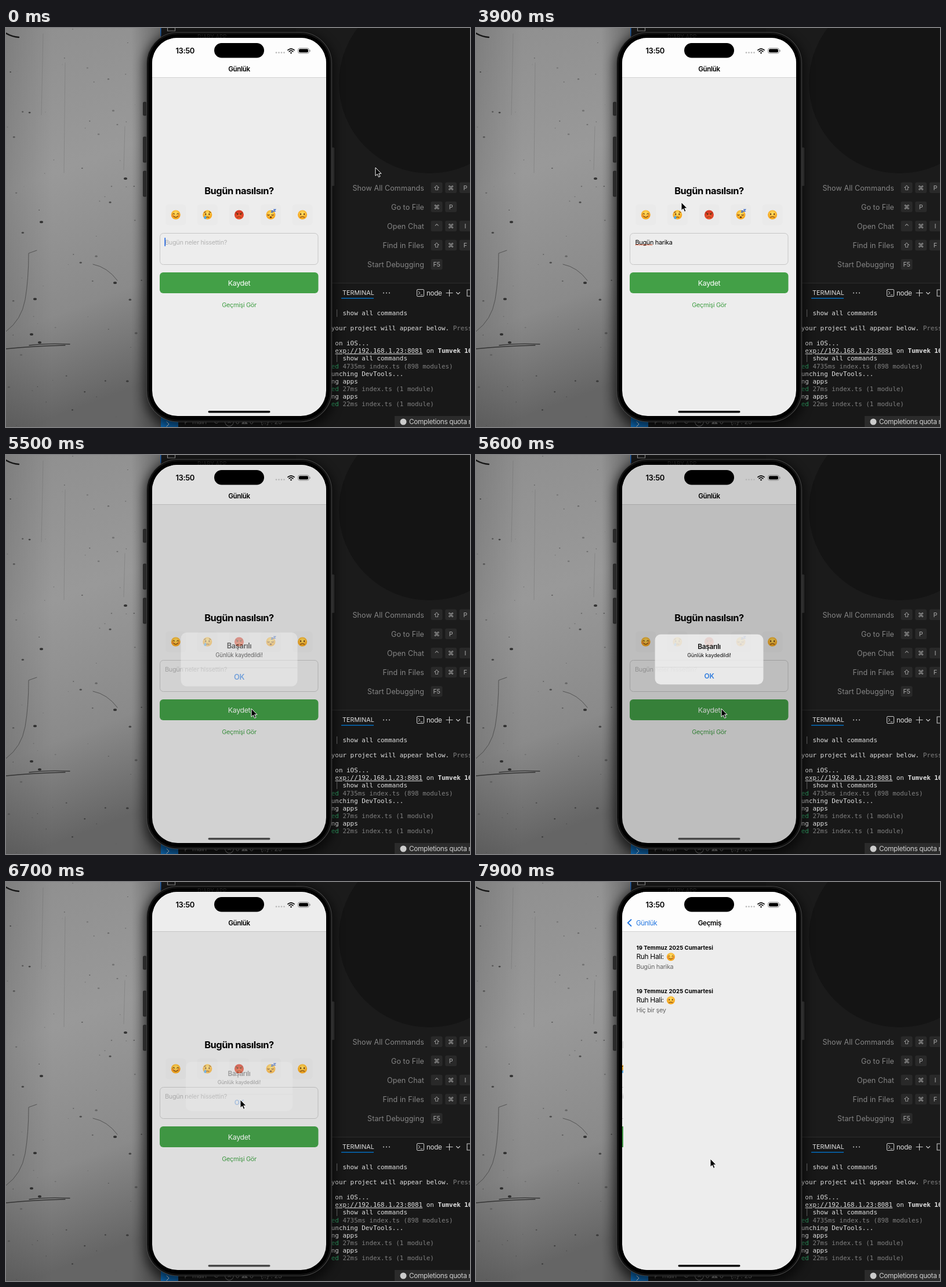
An HTML page that plays this animation: 800x689 px, repeating every 8000 ms.

```html
<!DOCTYPE html>
<html lang="tr">
<meta charset="utf-8">
<title>Günlük</title>
<style>
  html, body { margin: 0; width: 100%; height: 100%; overflow: hidden; background: #181818; }
  svg { display: block; }
  text { font-family: Inter, "DejaVu Sans", sans-serif; letter-spacing: -.028em; white-space: pre; }
  .mono { font-family: "DejaVu Sans Mono", monospace; font-size: 10.9px; letter-spacing: 0; }
  .plain { letter-spacing: .008em; }
</style>
<svg id="stage" width="800" height="689" viewBox="0 0 800 689">
  <defs>
    <linearGradient id="wall" x2=".15" y2="1">
      <stop stop-color="#8f8f8f"/><stop offset=".4" stop-color="#999"/>
      <stop offset=".75" stop-color="#8a8a8a"/><stop offset="1" stop-color="#656565"/>
    </linearGradient>
    <linearGradient id="wallEdge">
      <stop stop-color="#000" stop-opacity=".12"/><stop offset=".3" stop-opacity="0"/>
      <stop offset=".8" stop-opacity="0"/><stop offset="1" stop-opacity=".3"/>
    </linearGradient>
    <radialGradient id="yellow" cy=".35"><stop stop-color="#ffe066"/><stop offset="1" stop-color="#f6a821"/></radialGradient>
    <radialGradient id="red" cy=".7"><stop stop-color="#f5622f"/><stop offset="1" stop-color="#d93a25"/></radialGradient>
    <filter id="blur" x="-20%" y="-20%" width="140%" height="140%"><feGaussianBlur stdDeviation="9"/></filter>
    <clipPath id="screenClip"><rect x="252" y="17" width="300" height="653" rx="44"/></clipPath>
  </defs>
  <g id="desktop"></g>
  <g id="phone"></g>
  <g clip-path="url(#screenClip)">
    <rect x="252" y="17" width="300" height="653" fill="#ededed"/>
    <g id="diary"></g>
    <g id="history"></g>
    <g id="header"></g>
    <rect id="dim" x="252" y="17" width="300" height="653"/>
    <g id="status"></g>
    <g id="alert"></g>
  </g>
  <path id="cursor" d="M0 0V14.2L3.3 11.2L5.6 16.4L8 15.3L5.7 10.3H10Z" fill="#000" stroke="#fff" stroke-width="1" stroke-linejoin="round"/>
</svg>
<script>
const $ = id => document.getElementById(id);
const text = (x, y, size, str, attrs = '') =>
  `<text x="${x}" y="${y}" font-size="${size}" ${attrs}>${str}</text>`;
const rect = (x, y, w, h, r, fill, attrs = '') =>
  `<rect x="${x}" y="${y}" width="${w}" height="${h}" rx="${r}" fill="${fill}" ${attrs}/>`;
const line = (d, color, width = 1, attrs = '') =>
  `<path d="${d}" fill="none" stroke="${color}" stroke-width="${width}" stroke-linecap="round" ${attrs}/>`;
const MID = 'text-anchor="middle"', END = 'text-anchor="end"', SEMI = 'font-weight="600"', BOLD = 'font-weight="700"';

// Emoji faces, drawn around the origin with radius 8
const dots = '<ellipse cx="-3" cy="-1" rx="1" ry="1.4"/><ellipse cx="3" cy="-1" rx="1" ry="1.4"/>';
const stroke = d => line(d, '#6b3a10', 1.1);
const faces = {
  happy: stroke('M-5-1q1.5-2.6 3 0M2-1q1.5-2.6 3 0M-4 2.2q4 4.5 8 0') +
    '<g fill="#f2763c" opacity=".6"><circle cx="-5.4" cy="1.7" r="1.7"/><circle cx="5.4" cy="1.7" r="1.7"/></g>',
  cry: dots + stroke('M-2.5 4.8q2.5-2.2 5 0M-5.5-4l2.5-1M5.5-4l-2.5-1') +
    '<path d="M-3.8 1q4.4 6-.2 6.4q-4.2-.4.2-6.4" fill="#4aa8ee"/>',
  angry: dots + stroke('M-5.5-3.4l4.2 2M5.5-3.4l-4.2 2M-3 4.6q3-2.2 6 0'),
  sleepy: stroke('M-5.5 0q1.6 1.6 3.2 0M1.5 0q1.6 1.6 3.2 0') + '<ellipse cy="4.2" rx="1.8" ry="1.5" fill="#6b3a10"/>' +
    line('M1-7h2.6l-2.6 2.6h2.6M5-9.2h3.2l-3.2 3.2h3.2', '#3a68c8', 1.2),
  frown: dots + stroke('M-3.4 4.6q3.4-2.6 6.8 0'),
};
const face = (name, x, y, scale = 1) =>
  `<g transform="translate(${x} ${y}) scale(${scale})" fill="#5a3010">
    <circle r="8" fill="url(#${name === 'angry' ? 'red' : 'yellow'})"/>${faces[name]}</g>`;

let seed = 7;
const random = () => (seed = seed * 16807 % 2147483647) / 2147483647;

function drawWall() {
  let specks = '';
  for (let i = 0; i < 70; i++) {
    const size = .4 + random() * random() * 1.6;
    specks += `<ellipse cx="${random() * 235}" cy="${random() * 689}" rx="${size * 1.4}" ry="${size}" fill="#222" opacity="${.2 + random() * .5}"/>`;
  }
  for (const [x, y] of [[61, 335], [50, 468], [188, 440], [44, 529], [58, 543], [206, 260]])
    specks += `<ellipse cx="${x}" cy="${y}" rx="3" ry="2" fill="#1c1c1c" opacity=".8"/>`;
  return rect(0, 0, 270, 689, 0, 'url(#wall)') + rect(0, 0, 270, 689, 0, 'url(#wallEdge)') + specks +
    line('M0 9q10 6 22 7', '#161616', 2.5) +
    line('M0 554q50-5 102-6M40 548q30-4 70-2', '#333', 1.3) +
    line('M0 524q27-20 33-55t6-80l14-5M150 408q25 5 42 28', '#3c3c3c', 1, 'opacity=".7"') +
    line('M205 170l-2 75M102 60l-2 190M64 10l-3 140', '#666', 1, 'opacity=".35"');
}

function drawEditor() {
  const shortcuts = [['Show All Commands', '⇧⌘P'], ['Go to File', '⌘P'], ['Open Chat', '⌃⌘I'],
    ['Find in Files', '⇧⌘F'], ['Start Debugging', ['F5']]];
  let out = rect(267, 0, 533, 689, 0, '#181818') + rect(500, 0, 300, 440, 0, '#1b1b1b') +
    '<circle cx="730" cy="95" r="156" fill="#141414"/>' +
    rect(266, 0, 1.5, 14, 0, '#1b5fb0') + line('M278.500 0v5h13v-5', '#999', 1.2);
  shortcuts.forEach(([label, keys], row) => {
    const y = 276 + row * 33.1;
    out += text(721, y + 4.6, 12.5, label, `${END} fill="#858585" class="plain"`);
    [...keys].forEach((key, i) => {
      const x = 742.5 + i * 24.6;
      out += rect(x - 10, y - 9.5, 20, 18.5, 3, '#292929') + text(x, y + 4, 10.8, key, `${MID} fill="#aaa"`);
    });
  });

  out += rect(500, 440, 300, 1, 0, '#2d2d2d') +
    text(580, 461, 10.7, 'TERMINAL', 'fill="#e2e2e2" class="plain"') + rect(578, 466, 56, 1.3, 0, '#0078d4') +
    '<g fill="#ccc"><circle cx="651" cy="457.500" r="1"/><circle cx="656" cy="457.500" r="1"/><circle cx="661" cy="457.500" r="1"/></g>' +
    rect(708.5, 451.5, 12, 12, 1.5, 'none', 'stroke="#ccc"') + line('M711 455l3 2.500l-3 2.500M715 461h3', '#ccc') +
    text(725, 461.5, 11.6, 'node', 'fill="#ddd"') +
    line('M759 457.500h11M764.500 452v11M776.500 456.500l3 3l3-3M800 452h-5v11h5', '#ccc', 1.1);

  const dim = s => `<tspan fill="#808080">${s}</tspan>`;
  const bundled = s => `<tspan fill="#2f9e63">ed</tspan> ${dim(s)}`;
  const rows = {
    0: ` ${dim('│')} show all commands`,
    2: `your project will appear below. ${dim('Press ?')}`,
    4: ' on iOS...',
    5: ' <tspan text-decoration="underline">exp://192.168.1.23:8081</tspan> on <tspan font-weight="700">Tumvek 16</tspan>',
    6: ` ${dim('│')} show all commands`,
    7: bundled('4735ms index.ts (898 modules)'),
    8: 'unching DevTools...',
    9: 'ng apps',
    10: bundled('27ms index.ts (1 module)'),
    11: 'ng apps',
    12: bundled('22ms index.ts (1 module)'),
  };
  for (const row in rows) out += text(560.8, 495.6 + row * 13.13, 10.9, rows[row], 'class="mono" fill="#e0e0e0"');

  return out + rect(267, 670, 533, 19, 0, '#181818') + rect(267, 670, 30, 19, 0, '#0e70c0') +
    line('M277 680l4 4l-4 4', '#fff') + line('M309 676v8m0-3q5 0 5-5', '#888') +
    text(321, 684, 11.5, 'main', 'fill="#888"') +
    text(359, 684, 11.5, '⟳   ⊗ 0 ⚠ 0    {..} : 23', 'fill="#888"') +
    rect(670, 670, 130, 19, 0, '#2b2b2b') + '<circle cx="685" cy="680" r="5.500" fill="#ccc"/>' +
    text(695, 684, 11.8, 'Completions quota reached', 'fill="#d0d0d0"');
}

$('desktop').innerHTML = drawWall() + drawEditor();

$('phone').innerHTML =
  rect(238, 8, 328, 684, 58, '#000', 'opacity=".6" filter="url(#blur)"') +
  [[236.5, 128, 23], [236.5, 188, 44], [236.5, 247, 44], [561, 206, 67]].map(([x, y, h]) =>
    rect(x, y, 5.5, h, 1.5, '#2a2a2a', 'stroke="#111" stroke-width=".6"')).join('') +
  rect(242.5, 7.5, 319, 672.5, 54, '#0a0a0a', 'stroke="#444" stroke-width="1.2"') +
  rect(245, 10, 314, 667.5, 51, '#000', 'stroke="#1d1d1d"') +
  text(330, 17.5, 9.5, 'DIARY APP', 'fill="#222" class="plain"');

$('diary').innerHTML =
  text(402, 287, 16.4, 'Bugün nasılsın?', `${MID} ${BOLD}`) +
  Object.keys(faces).map((name, i) => {
    const x = 292.7 + i * 54.6;
    return rect(x - 17.5, 304.5, 35, 36, 5.5, '#eaeaea', `id="mood-${name}"`) + face(name, x, 322.5);
  }).join('') +
  rect(265.5, 354.5, 272.5, 54, 6, 'none', 'stroke="#c6c6c6"') +
  text(274, 373.5, 10.9, 'Bugün neler hissettin?', 'id="hint" fill="#b4b4b4"') +
  text(274.5, 373.5, 10.9, '', 'id="entry"') +
  line('M275.500 374.500h30', '#e2562f', 1.5, 'id="spelling" stroke-dasharray=".8 2.200"') +
  rect(0, 362, 1.8, 15, .9, '#2f6fe4', 'id="caret"') +
  rect(265, 422, 273.5, 36, 6, '#43a047') + text(402, 444.6, 12.3, 'Kaydet', `${MID} fill="#fff"`) +
  text(402, 482, 10.9, 'Geçmişi Gör', `${MID} fill="#43a047"`);

const entryCard = (y, mood, note) =>
  text(274.5, y + 3.6, 9.6, '19 Temmuz 2025 Cumartesi', `${BOLD} class="plain"`) +
  text(274.5, y + 20.4, 12, 'Ruh Hali:') + face(mood, 334, y + 16.2, .88) +
  text(274.5, y + 36.8, 10.9, note, 'fill="#666"');
$('history').innerHTML = rect(252, 17, 300, 653, 0, '#ededed') +
  entryCard(113, 'happy', 'Bugün harika') + entryCard(188, 'frown', 'Hiç bir şey');

$('header').innerHTML = rect(252, 17, 300, 68, 0, '#fdfdfd') + rect(252, 85, 300, 1, 0, '#d2d2d2') +
  text(402, 74.6, 11.6, 'Günlük', `${MID} ${SEMI} id="title"`) +
  `<g id="back">${text(293.5, 74.6, 11.6, 'Günlük', `${MID} fill="#1f74e0"`)}</g>` +
  line('M267.500 65l-5.700 5.500l5.700 5.500', '#1f74e0', 1.8, 'id="chevron"') +
  text(402, 74.6, 11.6, 'Geçmiş', `${MID} ${SEMI} id="nextTitle"`);

$('status').innerHTML = text(308.7, 44, 13, '13:50', `${MID} ${SEMI}`) + rect(359, 26, 86, 25.5, 12.7, '#000') +
  [466, 470.5, 475, 479.5].map(x => `<circle cx="${x}" cy="42.500" r="1.300" fill="#b5b5b5"/>`).join('') +
  line('M486 38.200q5.500-4.600 11 0M488.200 40.600q3.300-2.800 6.600 0', '#000', 1.7) + '<circle cx="491.500" cy="43" r="1.300"/>' +
  rect(503.5, 34.8, 19, 9, 3, 'none', 'stroke="#888"') + rect(505, 36.3, 16, 6, 1.8, '#000') + rect(523.5, 37.5, 1.2, 3.5, .6, '#888') +
  rect(348.5, 661, 107, 3.6, 1.8, '#000', 'id="homeBar"');

$('alert').innerHTML = rect(310, 310.5, 184, 85, 9.5, '#f0f0f0', 'fill-opacity=".93"') +
  rect(310, 366, 184, .7, 0, '#d6d6d6') +
  text(402, 335.2, 11.7, 'Başarılı', `${MID} ${SEMI}`) +
  text(402, 349, 8.8, 'Günlük kaydedildi!', `${MID} style="letter-spacing:-.01em"`) +
  text(402, 385.2, 11.7, 'OK', `${MID} ${SEMI} fill="#1f74e0"`);

const NOTE = 'Bugün harika';
const cursorPath = [[3300, 637, 241], [3400, 647, 262], [3500, 622, 297], [3600, 622, 297], [3900, 354, 301],
  [4200, 293, 325], [4450, 293, 325], [4900, 397, 416], [5150, 423, 438], [5700, 423, 438],
  [6250, 404, 376], [6850, 404, 376], [7150, 404, 478]];

const clamp = v => Math.min(1, Math.max(0, v));
const show = (id, opacity) => $(id).setAttribute('opacity', opacity);
const move = (id, x, y = 0, extra = '') => $(id).setAttribute('transform', `translate(${x} ${y})${extra}`);

function cursorAt(t) {
  const i = cursorPath.findIndex(p => p[0] > t);
  if (i === 0) return cursorPath[0].slice(1);
  if (i < 0) return cursorPath.at(-1).slice(1);
  const [t0, x0, y0] = cursorPath[i - 1], [t1, x1, y1] = cursorPath[i];
  const k = (t - t0) / (t1 - t0);
  return [x0 + (x1 - x0) * k, y0 + (y1 - y0) * k];
}

function render(t) {
  const saved = t >= 5500;
  const typed = saved ? 0 : Math.max(0, Math.min(NOTE.length, Math.floor((t - 1250) / 150)));
  $('entry').textContent = NOTE.slice(0, typed);
  show('hint', typed ? 0 : 1);
  show('spelling', typed > 6 ? 1 : 0);
  const caretOn = !saved && (t < 400 || (t >= 800 && t < 3700) || (t >= 4200 && t < 4700));
  show('caret', caretOn ? 1 : 0);
  $('caret').setAttribute('x', 273.3 + (typed ? $('entry').getComputedTextLength() + .8 : 0));
  $('mood-happy').setAttribute('fill', t >= 4300 && !saved ? '#90c6ea' : '#eaeaea');

  const enter = 1 - (1 - clamp((t - 5420) / 250)) ** 2;
  const alpha = enter * (1 - clamp((t - 6500) / 285));
  const scale = 1 + .2 * (1 - enter);
  show('dim', alpha * .215);
  show('alert', alpha);
  move('alert', 402, 353, ` scale(${scale}) translate(-402 -353)`);
  $('homeBar').setAttribute('fill', alpha > 0 ? '#484848' : '#000');

  const s = Math.max(0, t - 7350) / 1000 * 13;
  const push = 1 - (1 + s) * Math.exp(-s);
  move('diary', -90 * push);
  move('history', 300 * (1 - push));
  move('title', -108 * push);
  move('back', 108 * (1 - push));
  move('nextTitle', 130 * (1 - push));
  show('title', clamp(1 - push * 1.6));
  for (const id of ['back', 'chevron', 'nextTitle']) show(id, clamp(push * 1.5 - .48));

  move('cursor', ...cursorAt(t));
}

const start = performance.now();
function tick() {
  render(Math.floor((performance.now() - start) % 8000 / 100) * 100);
  requestAnimationFrame(tick);
}
tick();
</script>
</html>
```
